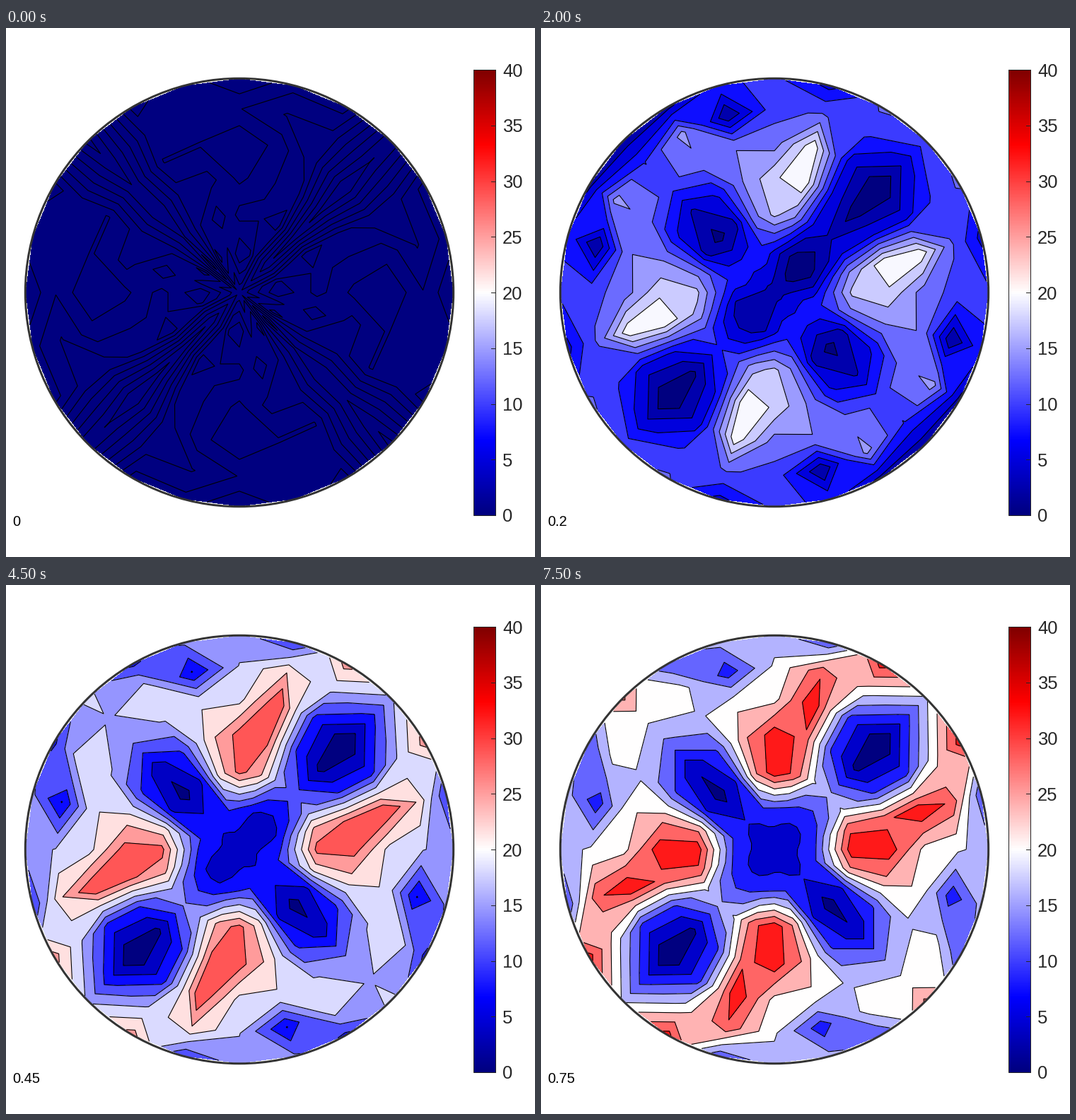
These frames come from a looping animation (748x748 px, 8000 ms). A matplotlib script:

```python
import numpy as np
import matplotlib.pyplot as plt
from matplotlib.animation import FuncAnimation
from matplotlib.colors import LinearSegmentedColormap
from matplotlib.patches import Circle, Rectangle

SIZE, DPI = 748, 100
PX = 72 / DPI
CX, CY, R = 330, 374, 302
FRAMES, STEP_MS = 16, 500
LEVELS = np.arange(10)
BASE = 4.8
INK = "#262626"

plt.rcParams["font.family"] = "Liberation Sans"
cmap = LinearSegmentedColormap.from_list(
    "pole",
    [(0, (0, 0, 0.5)), (1 / 6, (0, 0, 1)), (0.5, (1, 1, 1)),
     (5 / 6, (1, 0, 0)), (1, (0.5, 0, 0))], N=256)

# Equal-area projection of a hemisphere, 15 degree mesh
azimuth = np.radians(45 + 15 * np.arange(25))[:, None]
tilt = np.radians(15 * np.arange(7))
mesh = R * np.sqrt(2) * np.sin(tilt / 2) * np.exp(1j * azimuth)
X, Y = CX + mesh.real, CY - mesh.imag

# Peaks and wells: azimuth, radius, reach, height at start, height at end
SPOTS = [
    (0, 0, 78, -2.8, -3.9),
    (45, 55, 45, -1.3, 0),
    (45, 200, 68, -4.3, -4.9),
    (135, 56, 42, 1.8, 0.6),
    (135, 122, 55, -3.8, -4.2),
    (135, 200, 60, 0, -1.2),
    (90, 130, 53, 2.6, 4.3),
    (75, 190, 45, 4.0, 1.3),
    (75, 240, 50, 0.4, 3.4),
    (105, 205, 36, 1.6, 1.0),
    (105, 262, 36, -3.6, -2.6),
    (123, 250, 42, 2.3, 0.9),
    (60, 302, 40, 0, 3.4),
    (80, 305, 42, -2.5, -2.8),
    (120, 305, 36, -3.2, -1.8),
    (135, 305, 42, -3.8, 2.2),
]


def spot(angle, radius, reach, mirrored=True):
    """Round bump, repeated by the diagonal mirror and the half turn."""
    angles = [angle]
    if mirrored:
        angles += [90 - angle, angle + 180, 270 - angle]
    dist = np.min([abs(mesh - radius * np.exp(1j * np.radians(a)))
                   for a in angles], axis=0)
    return np.exp(-(dist / reach) ** 3)


def to_bands(z):
    return 0.05 + 8.9 * (z - z.min()) / np.ptp(z)


def make_noise():
    part = np.random.default_rng(5).random((7, 7))
    part[:, 0] = 0.5
    half = np.vstack([part, part[-2::-1]])
    disc = np.vstack([half, half[-2::-1]])
    z = (abs(np.cos(2 * azimuth)) ** 0.3 - 0.15 * np.sin(2 * azimuth)
         + 0.5 * disc)
    z[:, 0] = 0.8
    return to_bands(z)


noise = make_noise()
start, end = (
    BASE + sum(s[k] * spot(*s[:3]) for s in SPOTS) for k in (3, 4))
start -= 2.2 * spot(45, 100, 50, mirrored=False)


def field(t):
    if t == 0:
        return noise
    w = np.sin(np.pi / 2 * np.clip((t - 0.15) / 0.6, 0, 1))
    return to_bands(start + (end - start) * w)


def band_height(t):
    return np.interp(t, [0, 0.15, 0.25, 0.35, 0.45, 0.55],
                     [0, 2.0, 2.92, 3.57, 3.6, 4.0])


fig = plt.figure(figsize=(SIZE / DPI, SIZE / DPI), dpi=DPI, facecolor="white")
ax = fig.add_axes([0, 0, 1, 1])
ax.axis("off")

ax.add_patch(Circle((CX, CY), R + 0.7, fill=False, ec="#333333",
                    lw=3 * PX, zorder=4))

# Colour bar
ax.imshow(np.arange(256)[:, None], cmap=cmap, extent=(661, 692, 689, 59),
          origin="lower", aspect="auto", interpolation="nearest", zorder=1)
ax.add_patch(Rectangle((661, 59), 31.5, 630, fill=False, ec=INK,
                       lw=PX, zorder=2))
for v in range(0, 41, 5):
    y = 689 - v * 630 / 40
    ax.plot([686, 692], [y, y], color=INK, lw=PX, zorder=2)
    ax.text(702, y, str(v), size=25.5 * PX, color=INK,
            va="center_baseline")
label = ax.text(9, 697, "0", size=20 * PX, color="black",
                va="center_baseline")
ax.set(xlim=(0, SIZE), ylim=(SIZE, 0))

drawn = []


def update(i):
    while drawn:
        drawn.pop().remove()
    t = i * 0.05
    z = field(t)
    colors = cmap(band_height(t) * LEVELS[:-1] / 40)
    drawn.append(ax.contourf(X, Y, z, levels=LEVELS, colors=colors, zorder=2))
    drawn.append(ax.contour(X, Y, z, levels=LEVELS[1:-1], colors="black",
                            linewidths=1.1 * PX, zorder=3))
    label.set_text(f"{t:g}")
    return drawn


anim = FuncAnimation(fig, update, frames=FRAMES, init_func=lambda: [],
                     interval=STEP_MS, repeat=True, repeat_delay=0)
plt.show()
```
